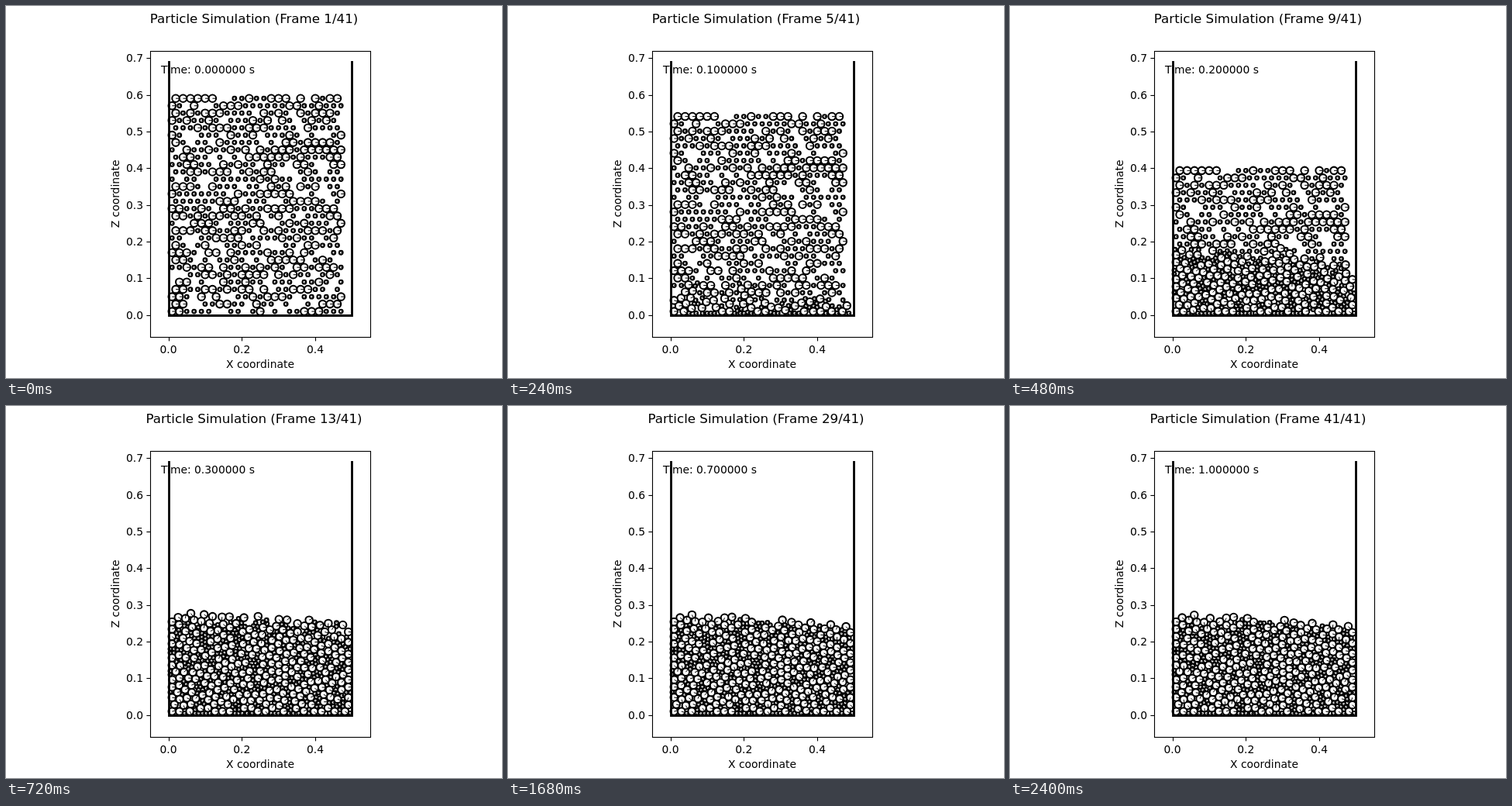
An HTML page with a canvas for the animation above (2.46 s loop, 640 by 480 pixels).

```html
<!DOCTYPE html>
<html lang="en">
<head>
<meta charset="utf-8">
<title>Particle Simulation</title>
<style>
  html, body { margin: 0; width: 100%; height: 100%; overflow: hidden; background: #fff; }
  canvas { display: block; }
</style>
</head>
<body>
<canvas id="stage" width="640" height="480"></canvas>
<script>
const FRAMES = 41, FRAME_MS = 60, STEPS = 80, DT = 0.025 / STEPS;
const WIDTH = 0.5, GRAVITY = 9.81, FRICTION = 0.3, MAX_RISE = 0.3;
const BIG = 0.01, SMALL = 0.005;
const SCALE = 473.85;
const toX = x => 209.54 + x * SCALE;
const toY = z => 398.82 - z * SCALE;
const snap = v => Math.floor(v + 0.5) + 0.5;

// ---- Simulation: discs dropped into an open box ----
let seed = 20;
function random() {
  seed = (Math.imul(seed, 1664525) + 1013904223) >>> 0;
  return seed / 4294967296;
}

function makeBody(x, z, r, w) {
  return { x, z, r, w, turn: 0, oldX: x, oldZ: z, oldTurn: 0, vx: 0, vz: 0, spin: 0, touched: false };
}

const wall = makeBody(0, 0, 1, 0);
const bodies = [];
for (let row = 0; row < 30; row++) {
  const odd = row % 2;
  for (let col = 0; col < 24 - odd; col++) {
    const pick = random();
    if (pick > 0.82) continue;
    const r = pick < 0.385 ? BIG : SMALL;
    bodies.push(makeBody(0.01 * (1 + odd) + 0.02 * col, 0.01 + 0.02 * row, r, (BIG / r) ** 2));
  }
}

// Push a and b apart along the normal (b to a), then apply rolling friction.
function resolve(a, b, nx, nz, depth) {
  if (depth < 1e-8) return;
  a.touched = b.touched = true;
  const total = a.w + b.w, push = depth / total;
  const slip = (a.z - a.oldZ - b.z + b.oldZ) * nx - (a.x - a.oldX - b.x + b.oldX) * nz
    - a.r * (a.turn - a.oldTurn) - b.r * (b.turn - b.oldTurn);
  const limit = FRICTION * depth;
  const drag = -Math.max(-limit, Math.min(limit, slip)) / (3 * total);
  const mx = nx * push - nz * drag, mz = nz * push + nx * drag;
  a.x += a.w * mx;
  a.z += a.w * mz;
  b.x -= b.w * mx;
  b.z -= b.w * mz;
  a.turn -= 2 * a.w * drag / a.r;
  b.turn -= 2 * b.w * drag / b.r;
}

function findPairs() {
  const pairs = [];
  for (let i = 0; i < bodies.length; i++) {
    for (let j = 0; j < i; j++) {
      const a = bodies[i], b = bodies[j], reach = a.r + b.r + 0.007;
      const dx = a.x - b.x, dz = a.z - b.z;
      if (dx * dx + dz * dz < reach * reach) pairs.push([a, b]);
    }
  }
  return pairs;
}

function step(pairs, damping) {
  for (const p of bodies) {
    p.oldX = p.x;
    p.oldZ = p.z;
    p.oldTurn = p.turn;
    p.touched = false;
    p.x += p.vx * DT;
    p.z += p.vz * DT - GRAVITY * DT * DT;
    p.turn += p.spin * DT;
  }
  for (let pass = 0; pass < 4; pass++) {
    for (const [a, b] of pairs) {
      const dx = a.x - b.x, dz = a.z - b.z, reach = a.r + b.r;
      const square = dx * dx + dz * dz;
      if (square >= reach * reach) continue;
      const gap = Math.sqrt(square) || 1e-9;
      resolve(a, b, dx / gap, dz / gap, reach - gap);
    }
    for (const p of bodies) {
      resolve(p, wall, 0, 1, p.r - p.z);
      resolve(p, wall, 1, 0, p.r - p.x);
      resolve(p, wall, -1, 0, p.x + p.r - WIDTH);
    }
  }
  for (const p of bodies) {
    const keep = (p.touched ? damping : 1) / DT;
    p.vx = (p.x - p.oldX) * keep;
    p.vz = Math.min((p.z - p.oldZ) * keep, MAX_RISE);
    p.spin = (p.turn - p.oldTurn) * keep;
  }
}

const poses = [];
for (let frame = 0; frame < FRAMES; frame++) {
  poses.push(bodies.map(({ x, z, r, turn }) => ({ x, z, r, turn })));
  let pairs;
  for (let i = 0; i < STEPS; i++) {
    if (i % 10 === 0) pairs = findPairs();
    step(pairs, frame < 12 ? 0.996 : 0.96);
  }
}

// ---- Drawing ----
const ctx = document.getElementById("stage").getContext("2d");

function label(text, x, y, align = "center", size = 13.89) {
  ctx.font = `${size}px "DejaVu Sans", sans-serif`;
  ctx.textAlign = align;
  ctx.fillText(text, x, y);
}

function stroke(width, ...points) {
  ctx.lineWidth = width;
  ctx.beginPath();
  for (const [x, y] of points) ctx.lineTo(x, y);
  ctx.stroke();
}

function drawAxes() {
  ctx.lineWidth = 1.11;
  ctx.strokeRect(186.5, 58.5, 284, 369);
  for (let i = 0; i < 8; i++) {
    const y = toY(i / 10);
    stroke(1.11, [186, snap(y)], [181.4, snap(y)]);
    label((i / 10).toFixed(1), 177, Math.round(y + 5), "right");
  }
  for (const value of [0, 0.2, 0.4]) {
    const x = toX(value);
    stroke(1.11, [snap(x), 428], [snap(x), 432.4]);
    label(value.toFixed(1), x, 448);
  }
  label("X coordinate", 328, 467);
  ctx.save();
  ctx.translate(146, 242.4);
  ctx.rotate(-Math.PI / 2);
  label("Z coordinate", 0, 0);
  ctx.restore();
}

function drawParticles(pose) {
  ctx.lineWidth = 2.08;
  ctx.beginPath();
  for (const { x, z, r } of pose) {
    ctx.moveTo(toX(x + r), toY(z));
    ctx.arc(toX(x), toY(z), r * SCALE, 0, 2 * Math.PI);
  }
  ctx.stroke();
  ctx.lineWidth = 1;
  ctx.beginPath();
  for (const { x, z, r, turn } of pose) {
    ctx.moveTo(toX(x), toY(z));
    ctx.lineTo(toX(x + r * Math.cos(turn)), toY(z + r * Math.sin(turn)));
  }
  ctx.stroke();
}

function draw(frame) {
  ctx.fillStyle = "#fff";
  ctx.fillRect(0, 0, 640, 480);
  ctx.fillStyle = ctx.strokeStyle = "#000";
  drawParticles(poses[frame]);
  drawAxes();
  stroke(2.78, [210.5, 71.1], [210.5, 399.5], [446.5, 399.5], [446.5, 71.1]);
  label(`Particle Simulation (Frame ${frame + 1}/${FRAMES})`, 320, 22, "center", 16.67);
  label(`Time: ${(frame * 0.025).toFixed(6)} s`, 200, 87, "left");
}

let shown = -1;
function tick(now) {
  const frame = Math.floor(now / FRAME_MS) % FRAMES;
  if (frame !== shown) draw(shown = frame);
  requestAnimationFrame(tick);
}
requestAnimationFrame(tick);
</script>
</body>
</html>
```
